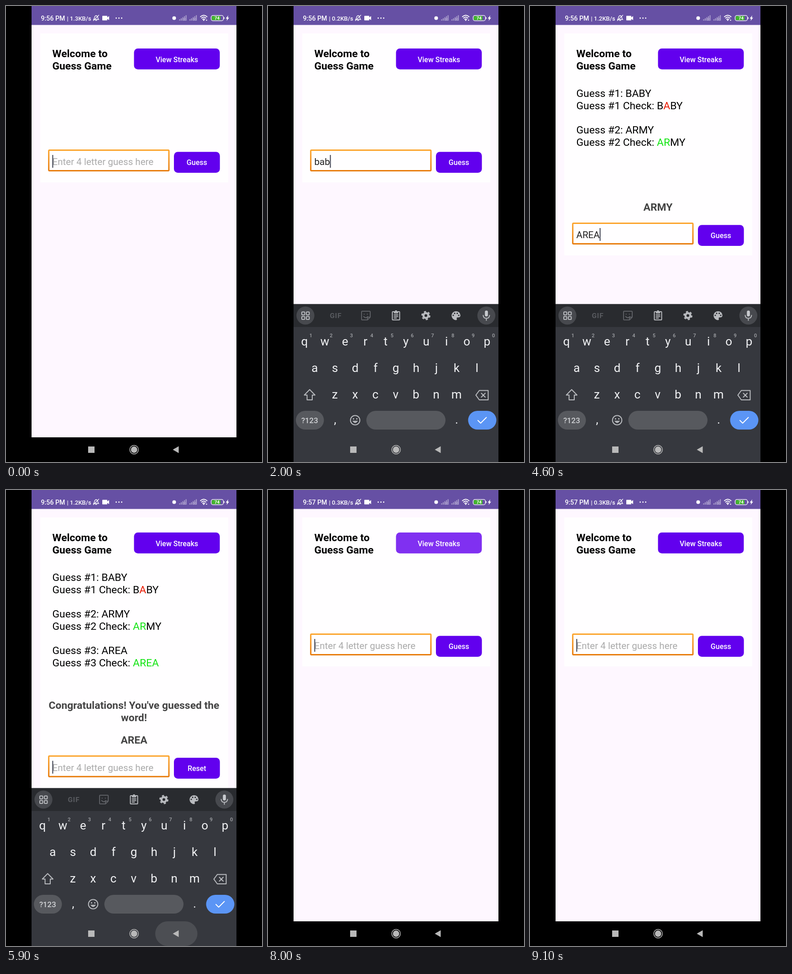
Recreate the animation shown at these times as an HTML page. Size 561 px wide and 998 px high, loop 9.2 s.

```html
<!DOCTYPE html>
<html lang="en">
<head>
<meta charset="utf-8">
<title>Word guess screen</title>
<style>
  html, body { margin: 0; width: 100%; height: 100%; overflow: hidden; background: #000; }
  svg { display: block; width: 100%; height: 100%; }
  text { font-family: Roboto, "Noto Sans", sans-serif; white-space: pre; }
  .h { font-size: 22.86px; }
  .b { font-weight: 700; }
  .m { font-weight: 500; }
  .field { font-size: 20.57px; }
  .btn { font-size: 16px; font-weight: 500; fill: #fff; }
  .mid { text-anchor: middle; }
  .line { fill: none; stroke: #b9bbbf; stroke-width: 2; stroke-linejoin: round; stroke-linecap: round; }
</style>
</head>
<body>
<svg viewBox="0 0 561 998">
  <defs>
    <clipPath id="phone"><rect x="56" width="449" height="998"/></clipPath>
    <linearGradient id="orange" x1="0" y1="0" x2="0" y2="1">
      <stop offset="0" stop-color="#fca42c"/><stop offset="1" stop-color="#e87c0c"/>
    </linearGradient>
    <filter id="shadow" x="-10%" y="-20%" width="120%" height="150%">
      <feDropShadow dx="0" dy="4" stdDeviation="5" flood-opacity=".4"/>
    </filter>
  </defs>
  <rect width="561" height="998"/>
  <g clip-path="url(#phone)">
    <rect x="56" width="449" height="944" fill="#fef7ff"/>
    <rect x="56" width="449" height="41.5" fill="#6650a4"/>
    <rect id="card" x="75" y="60" width="412" fill="#fffeff"/>
    <text class="h b" x="101.5" y="112">Welcome to</text>
    <text class="h b" x="101.5" y="138.8">Guess Game</text>
    <rect x="280.5" y="93" width="188" height="45.7" rx="8.5" fill="#6200ee"/>
    <rect id="viewTap" x="280.5" y="93" width="188" height="45.7" rx="8.5" fill="#fff" opacity=".19"/>
    <text class="btn mid" x="374.5" y="122.5">View Streaks</text>
    <g id="rows"></g>
    <g id="won" class="h b mid" fill="#444">
      <text x="280.5" y="479">Congratulations! You've guessed the</text>
      <text x="280.5" y="505.8">word!</text>
    </g>
    <g id="entry">
      <text id="word" class="h b mid" x="280.5" y="288" fill="#444"></text>
      <g id="plain">
        <rect x="94.5" y="314" width="261.5" height="47.5" fill="#fdfdfd" stroke="#d2d2d2" stroke-width="1.6"/>
        <path d="M94 361.5V313.8H356.500" fill="none" stroke="#b0b0b0" stroke-width="2"/>
      </g>
      <rect id="focus" x="93.700" y="315.500" width="263.300" height="45" rx="1.500" fill="#fffeff" stroke="url(#orange)" stroke-width="3"/>
      <text id="hint" class="field" x="101.5" y="348" fill="#aaa">Enter 4 letter guess here</text>
      <text id="typed" class="field" x="101.5" y="348" fill="#212121"></text>
      <rect id="caret" y="326" width="2.2" height="28" fill="#4b4e5c"/>
      <rect x="368" y="319.300" width="100.700" height="45.700" rx="8.5" fill="#6200ee"/>
      <rect id="guessTap" x="368" y="319.300" width="100.700" height="45.700" rx="8.5" fill="#fff" opacity=".19"/>
      <text id="action" class="btn mid" x="418.300" y="348.300"></text>
    </g>
    <g id="dialog">
      <rect x="56" width="449" height="944" opacity=".32"/>
      <rect x="86" y="403" width="389.500" height="179.500" rx="2.500" fill="#fffeff" filter="url(#shadow)"/>
      <text class="h m" x="113" y="448" fill="#1c1c1e">Win Streak</text>
      <text x="113" y="483.300" font-size="18.290" fill="#1c1c1e">Your current win streak is: 1</text>
      <text class="m mid" x="425" y="557" font-size="16" fill="#5c45a0">OK</text>
    </g>

    <g id="status" fill="#fff">
      <text id="clock" class="m" x="76.500" y="31.500" font-size="14.200"></text>
      <text id="rate" class="m" x="133.500" y="31.500" font-size="13"></text>
      <g fill="none" stroke="#fff" stroke-width="1.300" stroke-linecap="round">
        <path d="M192 29.500C194.500 27.500 193 21.500 197.500 21C202 21.500 200.500 27.500 203 29.500ZM196 31.500H199M191.500 32L203.500 20"/>
        <path d="M426 23.500Q433.300 17 440.600 23.500M428.500 26.500Q433.300 22 438 26.500M431 29.300Q433.300 27 435.600 29.300" stroke-width="1.800"/>
        <rect x="449.500" y="20.700" width="27" height="11.600" rx="4"/>
      </g>
      <path d="M212 21.500H221Q222 21.500 222 22.500V25L226 22V31L222 28V30.500Q222 31.500 221 31.500H212Q211 31.500 211 30.500V22.500Q211 21.500 212 21.500Z"/>
      <circle cx="241.500" cy="26.500" r="1.400"/><circle cx="247.500" cy="26.500" r="1.400"/><circle cx="253.500" cy="26.500" r="1.400"/>
      <circle cx="368.500" cy="26.500" r="4"/>
      <g id="signal" opacity=".42"></g>
      <circle cx="433.300" cy="31" r="1.500"/><circle cx="439.500" cy="31" r="1.300"/>
      <path d="M451 22.500Q451 22 453 22H470V31H453Q451 31 451 29.500Z" fill="#43b52e"/>
      <rect x="477.300" y="24.500" width="1.500" height="4" rx=".7"/>
      <text class="b mid" x="462.500" y="30" font-size="9.500">74</text>
      <path d="M487 20.500L481.500 27.500H484.500L483.500 32.500L489 25.500H486Z"/>
    </g>

    <rect x="56" y="944" width="449" height="54"/>
    <g id="keyboard">
      <rect x="56" y="652.500" width="449" height="346" fill="#36383e"/>
      <rect x="56" y="652.500" width="449" height="50" fill="#292b2f"/>
      <g fill="#47494e"><circle cx="82" cy="677.500" r="19.700"/><circle cx="478.500" cy="677.500" r="19.700"/></g>
      <g id="grid" class="line"></g>
      <text class="b mid" x="148.500" y="683" font-size="15.500" fill="#595b60" letter-spacing=".8">GIF</text>
      <g class="line" style="stroke:#5d5f64">
        <path d="M206.500 668H222.500Q224 668 224 669.500V681L218 687H206.500Q205 687 205 685.500V669.500Q205 668 206.500 668ZM224 681H218V687M209.500 679.500Q214.500 685 218.500 679.500M210.500 674.500H211M217.500 674.500H218"/>
      </g>
      <g class="line">
        <path d="M273.500 669H287.500Q288.500 669 288.500 670V686Q288.500 687 287.500 687H273.500Q272.500 687 272.500 686V670Q272.500 669 273.500 669ZM277 669V672H284V669M276.500 676H284.500M276.500 679.500H284.500M276.500 683H281.500"/>
        <circle cx="280.500" cy="668.500" r="1.500"/>
      </g>
      <g fill="none" stroke="#b9bbbf">
        <circle cx="346" cy="677.500" r="5.300" stroke-width="4.600"/>
        <circle cx="346" cy="677.500" r="8.600" stroke-width="2.800" stroke-dasharray="4.600 4.405"/>
      </g>
      <path d="M412 668A9.700 9.700 0 0 0 412 687.400Q414.500 687 413.800 684.700Q412.500 681.500 416 681.500H418Q421.700 681 421.700 677Q421 668.500 412 668Z" fill="#b9bbbf"/>
      <g fill="#292b2f"><circle cx="406" cy="677" r="1.600"/><circle cx="409" cy="672.700" r="1.600"/><circle cx="414.700" cy="672.700" r="1.600"/><circle cx="418" cy="677" r="1.600"/></g>
      <rect x="475.300" y="666.500" width="6.600" height="13" rx="3.300" fill="#c8cace"/>
      <path class="line" d="M471.500 677Q472 683.500 478.500 683.500Q485 683.500 485.500 677M478.500 684V688"/>
      <g id="keys" fill="#f1f2f4"></g>
      <path class="line" d="M91.300 839.500L103 851.500H97V862H85.600V851.500H79.600Z"/>
      <path class="line" d="M463 841.500H482.500V862H463L455.500 851.700ZM467.500 847.500L476 856M476 847.500L467.500 856"/>
      <g fill="#57595e">
        <rect x="61" y="886" width="61.500" height="41" rx="20.500"/>
        <rect x="215.500" y="886" width="173.500" height="41" rx="20.500"/>
        <rect x="438.500" y="886" width="62" height="41" rx="20.500" fill="#5b95f5"/>
      </g>
      <text class="m mid" x="91.300" y="912.500" font-size="16.800" fill="#cfd1d4">?123</text>
      <g class="line">
        <circle cx="191" cy="906.500" r="10.300"/>
        <path d="M185.800 908.500Q191 916 196.200 908.500Z" fill="#b9bbbf" stroke-width="1"/>
        <path d="M187.300 903.500H187.500M194.500 903.500H194.700" stroke-width="3"/>
        <path d="M460 907L466 913L478.500 900.500" style="stroke:#fff"/>
      </g>
    </g>
    <rect id="backTap" x="327" y="944" width="92.500" height="54" rx="27" fill="#4c4e53"/>
    <g fill="#b9b9b9">
      <rect x="180" y="964" width="14" height="14"/>
      <circle cx="280.700" cy="971" r="7"/>
      <circle cx="280.700" cy="971" r="9.500" fill="none" stroke="#b9b9b9" stroke-width="1.500"/>
      <path d="M365.500 971L378.500 963.500V978.500Z"/>
    </g>
  </g>
</svg>
<script>
const LOOP = 9200, STEP = 100, ANSWER = "AREA";
const RESET = 7300, HIDE = 5900, REFOCUS = 9100;
// times of the four letters, of the change to capitals and of the hand-in
const guesses = [
  { word: "BABY", keys: [1300, 1600, 1900, 2200], caps: 2400, send: 2600 },
  { word: "ARMY", keys: [3000, 3200, 3400, 3600], caps: 3700, send: 3800 },
  { word: "AREA", keys: [4100, 4200, 4400, 4500], caps: 4600, send: 4900 }
];
const taps = [700, RESET, REFOCUS];
const rates = [[0, "1.3"], [1200, "0.2"], [4100, "1.2"], [7000, "0.3"]];
const edits = [0, ...taps.filter(t => t !== RESET), ...guesses.flatMap(g => [...g.keys, g.send])];

const ui = Object.fromEntries([...document.querySelectorAll("[id]")].map(e => [e.id, e]));
const show = (el, on) => { el.style.display = on ? "" : "none"; };
const within = (t, a, b) => t >= a && t < b;
const ramp = (t, a, b) => Math.max(0, Math.min(1, (t - a) / (b - a)));
const easeOut = p => 1 - (1 - p) ** 3;

function buildKeys() {
  const put = (s, x, y, size, more = "") =>
    `<text class="mid" x="${x}" y="${y}" font-size="${size}" ${more}>${s}</text>`;
  const row = (letters, x, y) =>
    [...letters].map((c, i) => put(c, x + i * 44.45, y, 26)).join("");
  const digits = [..."1234567890"].map((d, i) =>
    put(d, 94 + i * 44.45, 724.5, 11, 'fill="#a3a5a9" font-weight="500"')).join("");
  ui.keys.innerHTML = row("qwertyuiop", 80, 743) + row("asdfghjkl", 102.3, 801) +
    row("zxcvbnm", 146.5, 859) + digits + put(",", 147, 914, 26) + put(".", 413.5, 914, 26);
  ui.grid.innerHTML = [0, 1, 2, 3].map(i =>
    `<rect x="${74 + i % 2 * 10}" y="${669.5 + (i >> 1) * 10}" width="6.500" height="6.500" rx="1.500"/>`).join("");
  ui.signal.innerHTML = [379.5, 402].map(x =>
    [0, 1, 2, 3, 4].map(i => `<rect x="${x + i * 3.5}" y="${29 - i * 2.2}" width="2.200" height="${3 + i * 2.2}"/>`).join("") +
    `<path d="M${x + 9} 27l5 5m0 -5l-5 5" stroke="#fff" stroke-width="1.400"/>`).join("");
}

function paint(word) {
  return [...word].map((c, i) => {
    const fill = ANSWER[i] === c ? "#12e412" : ANSWER.includes(c) ? "#ea1800" : "#000";
    return `<tspan fill="${fill}">${c}</tspan>`;
  }).join("");
}

function guessRows(list) {
  return list.map((g, i) => {
    const y = 199 + i * 80, name = `Guess #${i + 1}`;
    return `<text class="h" x="101.5" y="${y}">${name}: ${g.word}</text>` +
      `<text class="h" x="101.5" y="${y + 26.7}">${name} Check: ${paint(g.word)}</text>`;
  }).join("");
}

function typedAt(t) {
  const g = guesses.find(g => within(t, g.keys[0], g.send));
  if (!g) return "";
  const part = g.word.slice(0, g.keys.filter(k => k <= t).length);
  return t >= g.caps ? part : part.toLowerCase();
}

function render(t) {
  const done = t < RESET ? guesses.filter(g => g.send <= t) : [];
  const won = done.length === guesses.length;
  const shift = done.length * 80 + (won ? 26.7 : 0);
  const text = typedAt(t);
  const focused = !within(t, 8200, REFOCUS);

  ui.card.setAttribute("height", 326 + shift);
  ui.rows.innerHTML = guessRows(done);
  show(ui.won, won);
  ui.entry.setAttribute("transform", `translate(0 ${shift})`);
  ui.word.textContent = done.length ? done[done.length - 1].word : "";
  ui.action.textContent = won ? "Reset" : "Guess";
  ui.typed.textContent = text;
  show(ui.hint, !text);
  show(ui.focus, focused);
  show(ui.plain, !focused);

  const lastEdit = Math.max(...edits.filter(e => e <= t));
  show(ui.caret, focused && (t - lastEdit) % 1000 < 500);
  ui.caret.setAttribute("x", 101.3 + (text ? ui.typed.getComputedTextLength() : 0));

  const presses = [...guesses.map(g => g.send), RESET];
  show(ui.guessTap, presses.some(p => within(t, p - 100, p)));
  show(ui.viewTap, within(t, 7900, 8200));
  show(ui.backTap, within(t, 5800, 6000));

  const up = easeOut(ramp(t, 600, 1000)) * (1 - ramp(t, HIDE, HIDE + 100));
  show(ui.keyboard, up > 0);
  ui.keyboard.setAttribute("transform", `translate(0 ${346 * (1 - up)})`);

  const fade = ramp(t, 8000, 8300) * (1 - ramp(t, 8800, 9000));
  show(ui.dialog, fade > 0);
  ui.dialog.setAttribute("opacity", fade);

  ui.clock.textContent = t < 6600 ? "9:56 PM" : "9:57 PM";
  ui.rate.textContent = `| ${rates.filter(r => r[0] <= t).pop()[1]}KB/s`;
}

buildKeys();
const start = performance.now();
let last = -1;
function tick() {
  const elapsed = Math.max(0, performance.now() - start) % LOOP;
  const t = Math.floor(elapsed / STEP) * STEP;
  if (t !== last) render(last = t);
  requestAnimationFrame(tick);
}
tick();
</script>
</body>
</html>
```
